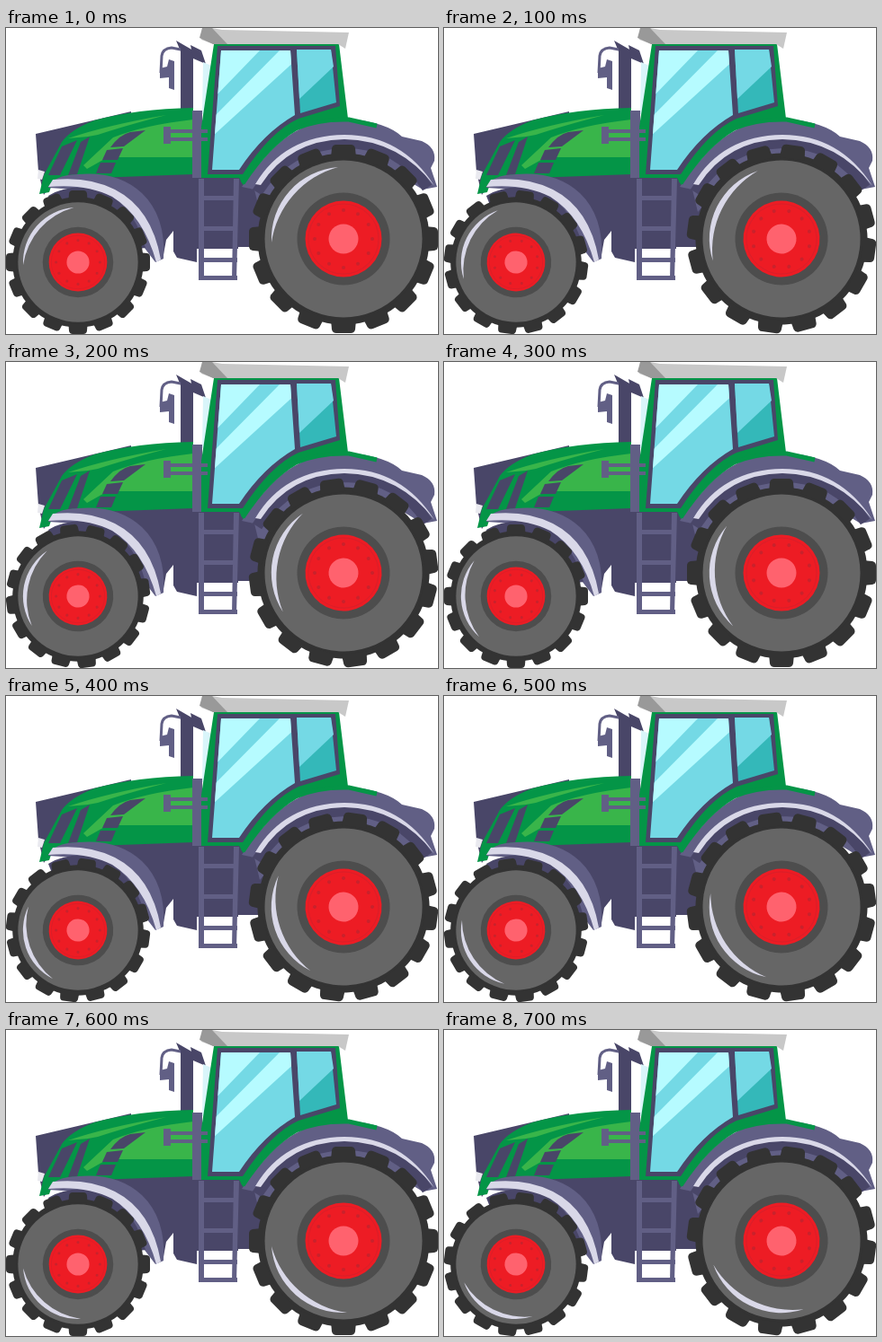
An HTML page with a canvas that plays this animation: 480x341 px, repeating every 0.8 s.

```html
<!DOCTYPE html>
<html lang="en">
<head>
<meta charset="utf-8">
<title>Tractor</title>
<style>
html, body { margin: 0; width: 100%; height: 100%; overflow: hidden; background: #fff; }
canvas { display: block; width: 480px; height: 341px; }
</style>
</head>
<body>
<canvas id="stage" width="480" height="341"></canvas>
<script>
const ctx = document.getElementById('stage').getContext('2d');
const STEP = 100, STEPS = 8, TURN = -15 * Math.PI / 180, TAU = Math.PI * 2;
const DARK = '#494668', MID = '#615f85', PALE = '#d9d8e8', GREEN = '#049547', LIME = '#39b54a';
const CYAN = '#74d9e5', ICE = '#b6fbff', TEAL = '#34b8b9', TYRE = '#333333', RUBBER = '#666666';

const fill = (d, color) => {
  ctx.fillStyle = color;
  ctx.fill(new Path2D(d));
};
const line = (d, color, width) => {
  ctx.strokeStyle = color;
  ctx.lineWidth = width;
  ctx.stroke(new Path2D(d));
};
const disc = (x, y, r, color) => {
  ctx.fillStyle = color;
  ctx.beginPath();
  ctx.arc(x, y, r, 0, TAU);
  ctx.fill();
};

function drawChassis() {
  fill('M100 160H290V244H258V246H212V261L190 256L186 249V226L178 236L174 258L140 190Z', DARK);
  // ladder
  fill('M214 168H220V281H214ZM253 168H259V168L256 281H251Z', MID);
  for (const y of [187, 221, 256, 276]) fill(`M215 ${y}H257V${y + 5}H215Z`, MID);
}

function drawExhaust() {
  fill('M189 14L208 25V94H194V26Z', DARK);
  fill('M205 19L217 25L222 40L208 34Z', DARK);
  fill('M219 38L228 42L224 96H218Z', '#d9f5fa');
  line('M194 24L184 22Q174 23 173 31L172 50', MID, 3);
  fill('M171 45L179 43L181 35L187 37V69L181 67V55L171 56Z', MID);
}

function drawHood() {
  fill('M33 118L139 93V98L90 118L42 186L36 160Z', DARK);
  fill('M37 185L42 164L62 127Q72 113 98 103Q145 90 208 89V163L100 167L52 171L48 183Z', GREEN);
  fill('M86 153L119 122Q154 108 208 102V144H113L90 157Z', LIME);
  fill('M69 123Q113 108 178 97Q132 109 102 119L91 121Z', LIME);
  fill('M47 164L62 132L79 125L60 164ZM69 164L83 127L93 121L79 163Z', DARK);
  fill('M116 133Q126 119 138 116L155 114L131 132Z', DARK);
  fill('M112 136L130 134L124 147H107ZM105 150H122L117 162H100Z', DARK);
  fill('M36 158L43 160L40 169L35 168Z', '#e9e9ef');
  fill('M207 92H218V167H207Z', MID);
}

function drawFrontFender() {
  fill('M47 178Q52 164 80 163Q124 159 151 184Q178 210 175 257L166 261L150 240L120 195L78 180Z', MID);
  fill('M47 187Q65 175 96 178Q140 190 155 245L120 250L60 220Z', DARK);
  fill('M47 177L52 169Q92 165 121 180Q162 201 172 258L167 261Q153 210 118 188Q89 173 47 177Z', PALE);
}

function drawCab() {
  fill('M231 18H370L380 101Q321 103 292 137L264 176L259 167H217V110Z', GREEN);
  fill('M235 20H366L371 87L325 101Q294 115 263 163H224Z', DARK);
  const pane = 'M239 25H316L321 97Q286 117 259 158H229Z';
  fill(pane, CYAN);
  fill('M323 24H361L367 83L327 95Z', TEAL);
  fill('M323 24H361L364 43L326 79Z', CYAN);
  ctx.save();
  ctx.clip(new Path2D(pane));
  fill('M235 25H282L229 80ZM304 25H325V33L229 121V101Z', ICE);
  ctx.restore();
  // roof
  fill('M218 0H229L240 2L381 5L377 23L369 18H231L217 13Z', '#c8c8c8');
  fill('M218 0H229L246 18H230L215 11Z', '#999999');
  // door handle rail
  fill('M181 113H224V117H181ZM181 122H224V126H181Z', MID);
  fill('M175 110H183V129H175Z', MID);
}

function drawRearFender() {
  fill('M262 177Q290 137 311 122Q340 101 380 101Q423 105 440 121L462 126Q478 133 476 148L472 156L479 177L463 180L430 160L375 145L320 160L282 205L276 180Z', MID);
  line('M279 183Q313 130 376 128Q437 128 468 178', DARK, 12);
  fill('M277 174Q309 120 376 119Q440 119 476 176Q437 125 376 124Q315 125 283 175Z', PALE);
  line('M263 173Q292 129 322 112Q347 101 381 102L412 109', GREEN, 5);
}

function drawWheel(x, y, r, turn) {
  const lugs = 16, bolts = 12;
  ctx.save();
  ctx.translate(x, y);
  ctx.scale(r / 105, r / 105);
  ctx.rotate(turn);
  disc(0, 0, 95.5, TYRE);
  for (let i = 0; i < lugs; i++) {
    fill('M-14 -90L-13 -101Q-12 -105 -8 -105H8Q12 -105 13 -101L14 -90Z', TYRE);
    ctx.rotate(TAU / lugs);
  }
  disc(0, 0, 87.5, RUBBER);
  fill('M-80 4A80 80 0 0 1 -6 -80A102 102 0 0 0 -80 4Z', PALE);
  disc(0, 0, 51.5, '#4d4d4d');
  disc(0, 0, 42.5, '#ed1c24');
  ctx.strokeStyle = '#d91f2a';
  ctx.lineWidth = 1;
  ctx.beginPath();
  ctx.arc(0, 0, 39, 0, TAU);
  ctx.stroke();
  for (let i = 0; i < bolts; i++) {
    const a = i * TAU / bolts;
    disc(32 * Math.cos(a), 32 * Math.sin(a), 2, '#c9222c');
  }
  disc(0, 0, 16.5, '#ff626e');
  ctx.restore();
}

function draw(now) {
  const turn = Math.floor(now / STEP) % STEPS * TURN;
  ctx.fillStyle = '#fff';
  ctx.fillRect(0, 0, 480, 341);
  drawChassis();
  drawExhaust();
  drawHood();
  drawFrontFender();
  drawCab();
  drawRearFender();
  drawWheel(80, 261, 80, turn);
  drawWheel(375, 235, 105, turn);
}

const start = performance.now();
function tick() {
  draw(performance.now() - start);
  requestAnimationFrame(tick);
}
tick();
</script>
</body>
</html>
```
